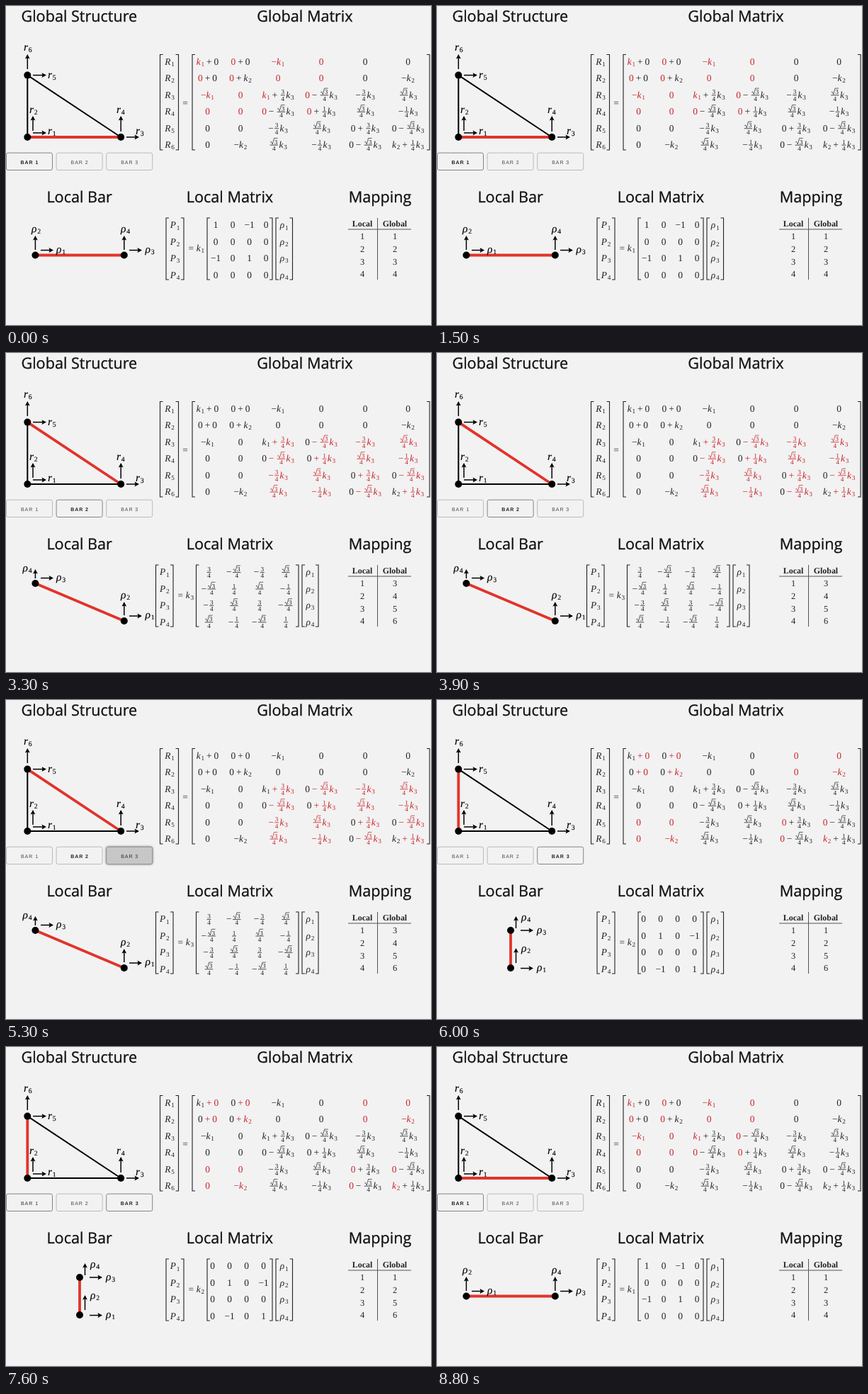
An HTML page for the animation above (8900 ms loop, 600 px wide and 450 px high).

```html
<!DOCTYPE html>
<html lang="en">
<head>
<meta charset="utf-8">
<title>Global and local stiffness</title>
<style>
html, body { margin: 0; width: 100%; height: 100%; overflow: hidden; background: #f2f2f2; }
svg { display: block; width: 600px; height: 450px; text-rendering: geometricPrecision; }
.head { font: 21.6px "Open Sans", "Noto Sans", sans-serif; fill: #111; stroke: #111; stroke-width: .3; text-anchor: middle; }
.math, .table { font-family: "Liberation Serif", Times, serif; }
.table { font-size: 12.4px; fill: #222; text-anchor: middle; }
.btn text { font: 7px "Liberation Sans", Arial, sans-serif; letter-spacing: .95px; text-anchor: middle; fill: #484848; }
.btn rect { fill: #f2f2f2; stroke: #bbb; }
.btn.dark rect { stroke: #858585; }
.btn.dark text, .btn.down text { fill: #2c2c2c; }
.btn.on text { font-weight: bold; fill: #222; }
.btn.down rect { fill: #c7c7c7; stroke: #929292; filter: drop-shadow(0 0 1.5px #777); }
</style>
</head>
<body>
<svg id="stage" viewBox="0 0 600 450"></svg>
<script>
const INK = '#222', RED = '#c8232a', BAR = '#e2332b';
const SIZE = 13.4, SMALL = 9.2, LOOP = 8900;
const SERIF = '"Liberation Serif", Times, serif';
const pen = document.createElement('canvas').getContext('2d');

function width(s, size, italic) {
  pen.font = `${italic ? 'italic ' : ''}${size}px ${SERIF}`;
  return pen.measureText(s).width;
}

const glyph = (x, y, s, size, color, italic) =>
  `<text x="${x.toFixed(2)}" y="${y.toFixed(2)}" font-size="${size}" fill="${color}"` +
  `${italic ? ' font-style="italic"' : ''}>${s}</text>`;
const path = (d, color, w) => `<path d="${d}" fill="none" stroke="${color}" stroke-width="${w}"/>`;

// Each piece has a width and a draw function taking a left edge and baseline.
function piece(tok, color, binary) {
  if (tok.includes('/')) {
    const root = tok[0] === 'S', num = root ? '3' : tok[0];
    const w = root ? 11.4 : 6, gap = 1.4;
    return { w: w + gap * 2, draw(x, y) {
      x += gap;
      let out = path(`M${x} ${y - 3.7}h${w}`, color, .8);
      out += glyph(x + (root ? 6 : .7), y - 5.2, num, SMALL, color);
      if (root) {
        out += path(`M${x + .5} ${y - 7.8}l1.3 -.8l1.8 3.8l2.2 -8.6h5.1`, color, .7);
      }
      return out + glyph(x + w / 2 - 2.3, y + 4, '4', SMALL, color);
    } };
  }
  if (/[a-zρ]/i.test(tok)) {
    const w = width(tok[0], SIZE, true) + .8;
    return { w: w + width(tok[1], SMALL), draw: (x, y) =>
      glyph(x, y, tok[0], SIZE, color, true) + glyph(x + w, y + 2.2, tok[1], SMALL, color) };
  }
  const pad = binary ? SIZE * (tok === '=' ? .278 : .222) : 0;
  return { w: width(tok, SIZE) + pad * 2, draw: (x, y) => glyph(x + pad, y, tok, SIZE, color) };
}

// A term may start with its bar's letter, e.g. "Ak1 C+0".
function math(cx, cy, expr, lit) {
  const parts = [];
  for (const term of expr.split(' ')) {
    const owner = /^[ABC]/.test(term) ? term[0] : '';
    const color = owner && owner === lit ? RED : INK;
    for (const tok of term.slice(owner.length).match(/[kRPρ]\d|[S\d]\/4|[+−=]|\d/g)) {
      parts.push(piece(tok, color, tok === '=' || (/[+−]/.test(tok) && parts.length > 0)));
    }
  }
  let x = cx - parts.reduce((sum, p) => sum + p.w, 0) / 2;
  return parts.map(p => { const s = p.draw(x, cy + 4.5); x += p.w; return s; }).join('');
}

const bracket = (x, y1, y2, arm) => path(`M${x + arm} ${y1}H${x}V${y2}h${arm}`, INK, 1.1);
const brackets = (l, r, y1, y2) => bracket(l, y1, y2, 4) + bracket(r, y1, y2, -4);
const line = (a, b, color, w) => path(`M${a}L${b}`, color, w);
const dot = p => `<circle cx="${p[0]}" cy="${p[1]}" r="5" fill="#000"/>`;

// Arrow pointing up or right.
function arrow(x, y, len, dir) {
  const turn = dir === 'up' ? -90 : 0;
  return `<g transform="translate(${x} ${y}) rotate(${turn})">` +
    path(`M0 0H${len - 4}`, '#000', 1.5) +
    `<path d="M${len} 0l-6.5 -3.4l1.2 3.4l-1.2 3.4z"/></g>`;
}

function label(x, y, name, n) {
  const w = width(name, 15.5, true);
  return `<g stroke="#000" stroke-width=".12">` + glyph(x, y, name, 15.5, '#000', true) +
    glyph(x + w + .7, y + 2, n, 9.8, '#000') + '</g>';
}

const ROWS = [78, 101.6, 125, 148.6, 172, 195.4];
const COLS = [284.5, 331, 384, 445, 507, 567.5];
const GLOBAL = [
  'Ak1 C+0|A0 C+0|A−k1|A0|C0|C0',
  'A0 C+0|A0 C+k2|A0|A0|C0|C−k2',
  'A−k1|A0|Ak1 B+3/4k3|A0 B−S/4k3|B−3/4k3|BS/4k3',
  'A0|A0|A0 B−S/4k3|A0 B+1/4k3|BS/4k3|B−1/4k3',
  'C0|C0|B−3/4k3|BS/4k3|C0 B+3/4k3|C0 B−S/4k3',
  'C0|C−k2|BS/4k3|B−1/4k3|C0 B−S/4k3|Ck2 B+1/4k3'
];
const NODES = [[30.3, 97.6], [30.3, 185], [162.2, 185]];

// Bracket edges of the P vector, matrix and rho vector, and the equation centre.
const FLAT = { p: [226, 251], eq: 267, m: [284, 376], rho: [381, 404.5] };
const WIDE = { p: [211.5, 236], eq: 252, m: [268.5, 413], rho: [418, 441] };
const VIEWS = [
  { lit: 'A', ends: [1, 2], k: 'k1', box: FLAT, cols: [296, 320, 343.5, 367],
    cells: ['1|0|−1|0', '0|0|0|0', '−1|0|1|0', '0|0|0|0'], map: [1, 2, 3, 4],
    bar: [[41.4, 351.5], [166.8, 351.5]],
    arrows: [[49, 344.5, 18, 'right'], [41.4, 344, 20, 'up'], [174, 344.5, 18, 'right'], [166.8, 344, 20, 'up']],
    tags: [[71, 347.5], [36, 319], [196.5, 347.5], [162, 319]] },
  { lit: 'B', ends: [0, 2], k: 'k3', box: WIDE, cols: [286.5, 322, 358, 395],
    cells: ['3/4|−S/4|−3/4|S/4', '−S/4|1/4|S/4|−1/4', '−3/4|S/4|3/4|−S/4', 'S/4|−1/4|−S/4|1/4'],
    map: [3, 4, 5, 6],
    bar: [[41.4, 325], [166.8, 378]],
    arrows: [[174, 371, 18, 'right'], [166.8, 370, 19, 'up'], [49, 317.5, 18, 'right'], [41.4, 318, 13, 'up']],
    tags: [[196.5, 373.5], [162, 345.5], [71, 320.5], [23.5, 308]] },
  { lit: 'C', ends: [0, 1], k: 'k2', box: FLAT, cols: [291.5, 315.5, 339.5, 363.5],
    cells: ['0|0|0|0', '0|1|0|−1', '0|0|0|0', '0|−1|0|1'], map: [1, 2, 5, 6],
    bar: [[104, 325], [104, 378]],
    arrows: [[118, 378.5, 18, 'right'], [111.5, 371, 21, 'up'], [118, 325, 18, 'right'], [111.5, 322, 17, 'up']],
    tags: [[141, 382], [119, 354.5], [141, 328.5], [119, 311]] }
];

function fixed() {
  const heads = [[103.3, 22, 'Global Structure'], [422, 22, 'Global Matrix'],
    [103.6, 277, 'Local Bar'], [316, 277, 'Local Matrix'], [528, 277, 'Mapping']];
  let out = heads.map(([x, y, s]) => `<text class="head" x="${x}" y="${y}">${s}</text>`).join('');
  out += line(NODES[0], NODES[1], '#000', 2) + line(NODES[1], NODES[2], '#000', 2) + line(NODES[0], NODES[2], '#000', 2);
  out += '<g class="math">';
  out += arrow(38, 179, 19, 'right') + arrow(38, 176, 21, 'up') + arrow(170, 185, 18, 'right') +
    arrow(162.2, 177, 22, 'up') + arrow(38, 97.6, 19, 'right') + arrow(30.3, 89, 21, 'up');
  [[59, 181], [33, 150.5], [183, 181], [156, 150.5], [59, 102], [25, 63]]
    .forEach(([x, y], i) => { out += label(x, y, 'r', i + 1); });
  out += brackets(217.5, 243.5, 68.5, 203) + brackets(263, 598, 68.5, 203);
  ROWS.forEach((y, i) => { out += math(231, y, 'R' + (i + 1)); });
  out += math(253, 136, '=') + '</g>';
  out += path('M483 315H572M524.5 299V386', '#555', 1);
  out += '<g class="table"><g font-weight="bold" font-size="11.9"><text x="503" y="311.3">Local</text>' +
    '<text x="549" y="311.3">Global</text></g>';
  for (let i = 0; i < 4; i++) out += `<text x="503" y="${329.2 + i * 17.7}">${i + 1}</text>`;
  return out + '</g>';
}

function view(v) {
  const { box } = v, mid = ([a, b]) => (a + b) / 2;
  let out = line(NODES[v.ends[0]], NODES[v.ends[1]], BAR, 3.8) + line(v.bar[0], v.bar[1], BAR, 3.8);
  out += v.bar.map(dot).join('') + '<g class="math">';
  v.arrows.forEach(a => { out += arrow(...a); });
  v.tags.forEach(([x, y], i) => { out += label(x, y, 'ρ', i + 1); });
  GLOBAL.forEach((row, r) => row.split('|').forEach((cell, c) => {
    out += math(COLS[c], ROWS[r], cell, v.lit);
  }));
  for (const pair of [box.p, box.m, box.rho]) out += brackets(pair[0], pair[1], 299, 386);
  out += math(box.eq, 341.5, '=' + v.k);
  v.cells.forEach((row, r) => {
    const y = 308.8 + r * 23.4;
    out += math(mid(box.p), y, 'P' + (r + 1)) + math(mid(box.rho), y, 'ρ' + (r + 1));
    row.split('|').forEach((cell, c) => { out += math(v.cols[c], y, cell); });
  });
  out += '</g><g class="table">';
  v.map.forEach((n, i) => { out += `<text x="549" y="${329.2 + i * 17.7}">${n}</text>`; });
  return out + '</g>';
}

const button = i => {
  const x = .5 + i * 70.6;
  return `<g class="btn"><rect x="${x}" y="207.2" width="65" height="24.3" rx="2.5"/>` +
    `<text x="${x + 33}" y="222.6">BAR ${i + 1}</text></g>`;
};

const stage = document.getElementById('stage');
stage.innerHTML = fixed() + VIEWS.map(v => `<g class="view">${view(v)}</g>`).join('') +
  NODES.map(dot).join('') + [0, 1, 2].map(button).join('');
const views = [...stage.querySelectorAll('.view')];
const buttons = [...stage.querySelectorAll('.btn')];

// time, shown bar, outlined buttons, pressed button
const STEPS = [
  [0, 0, [0], -1],
  [2600, 0, [0, 1], -1],
  [2800, 0, [], 1],
  [3000, 0, [1], -1],
  [3300, 1, [1], -1],
  [5000, 1, [1, 2], -1],
  [5200, 1, [], 2],
  [5400, 1, [2], -1],
  [5500, 2, [2], -1],
  [7500, 2, [0, 2], -1],
  [7800, 2, [], 0],
  [8000, 2, [0], -1],
  [8100, 0, [0], -1]
];

let last;
function frame(now) {
  const t = now % LOOP;
  const step = STEPS.findLast(s => s[0] <= t) || STEPS[0];
  if (step !== last) {
    last = step;
    const [, shown, dark, down] = step;
    views.forEach((g, i) => { g.style.display = i === shown ? '' : 'none'; });
    buttons.forEach((b, i) => {
      b.classList.toggle('on', i === shown);
      b.classList.toggle('dark', dark.includes(i));
      b.classList.toggle('down', i === down);
    });
  }
  requestAnimationFrame(frame);
}
frame(0);
</script>
</body>
</html>
```
